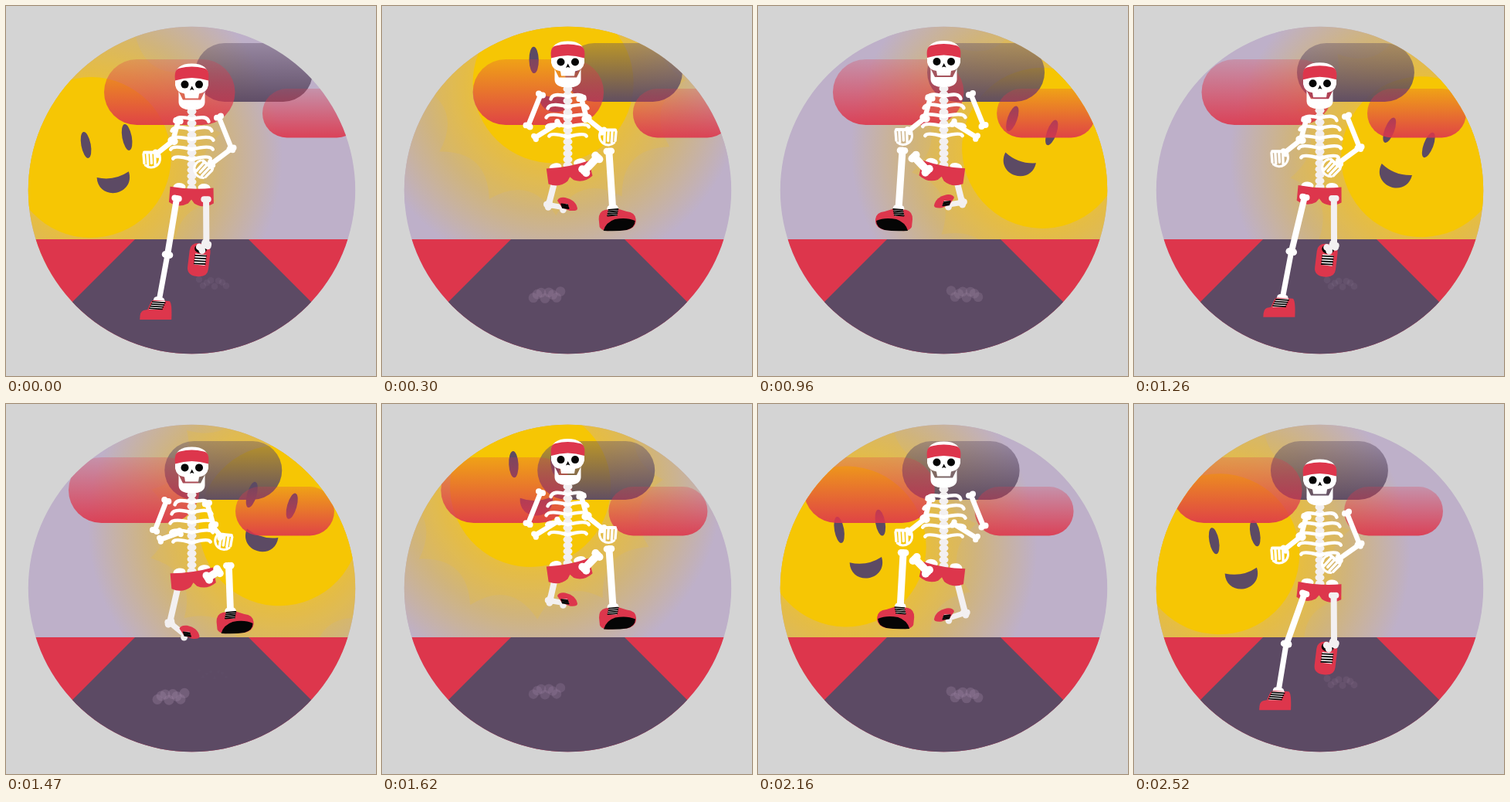
Animation of 479x479 px, one loop 2.55 s. Source, as an HTML page with a canvas:

```html
<!DOCTYPE html>
<html lang="en">
<head>
<meta charset="utf-8">
<title>Running skeleton</title>
<style>
html, body { margin: 0; width: 100%; height: 100%; overflow: hidden; background: #d4d4d4; }
canvas { display: block; }
</style>
</head>
<body>
<canvas id="stage" width="479" height="479"></canvas>
<script>
const c = document.getElementById('stage').getContext('2d');
const LOOP = 2550, CYCLE = LOOP / 2, STEP = CYCLE / 2, MID = 240.5;
const RED = '#dd364c', PLUM = '#5c4a64', SKY = '#beb0c9', GOLD = '#f6c604';
const BONE = '#fff', BONE_BACK = '#f3f0f1', BLACK = '#050505';

const mod = (a, n) => ((a % n) + n) % n;
const rad = d => d * Math.PI / 180;
const mix = (a, b, u) => a.map((v, i) => v + (b[i] - v) * u);
// Smooth 0 to 1 between two times.
const ramp = (t, from, to) => {
  const u = Math.min(1, Math.max(0, (t - from) / (to - from)));
  return u * u * (3 - 2 * u);
};

// --- Motion ---

// Top of the head: a quick push up, then a slower fall.
function bodyTop(t) {
  const u = mod(t - 95, STEP) / STEP, rise = .37;
  const w = u < rise ? (u / rise) ** .55 : 1 + (u - rise) / (1 - rise);
  return 62 + 17 * Math.cos(Math.PI * w);
}
const hipTilt = p => -11 * Math.sin(2 * Math.PI * (p - 35) / CYCLE);

// 1 while the runner is in the air.
function airborne(p) {
  const s = mod(p, STEP);
  return ramp(s, 0, 247) - ramp(s, 345, STEP);
}

// Key poses of a leg: time, knee, ankle.
const STRIDE = [
  [0, 209, 322, 198, 381],
  [250, 213, 270, 235, 277],
  [330, 217, 254, 235, 257],
  [620, 222, 310, 230, 315],
  [890, 188, 192, 184, 262],
  [970, 187, 187, 182, 262],
  [1245, 197, 310, 187, 371]];

// Periodic cubic through the key poses, without overshoot.
function legPose(p) {
  const n = STRIDE.length;
  const key = i => STRIDE[mod(i, n)];
  const time = i => key(i)[0] + Math.floor(i / n) * CYCLE;
  const rate = (i, k) => (key(i + 1)[k] - key(i)[k]) / (time(i + 1) - time(i));
  const slope = (i, k) => {
    const a = rate(i - 1, k), b = rate(i, k);
    return a * b <= 0 ? 0 : 2 * a * b / (a + b);
  };
  let i = n - 1;
  while (time(i) > p) i--;
  const h = time(i + 1) - time(i), u = (p - time(i)) / h, v = 1 - u;
  return [1, 2, 3, 4].map(k =>
    key(i)[k] * v * v * (1 + 2 * u) + key(i + 1)[k] * u * u * (3 - 2 * u)
    + h * u * v * (v * slope(i, k) - u * slope(i + 1, k)));
}

// Shoulder, elbow and hand, measured from the top of the head.
const ARM_FRONT = [223, 74, 216, 100, 187, 123];
const ARM_BACK = [205.5, 69, 189, 110, 225, 137];
const HAND_TUCKED = [240, 99];

// Swing across on one step, then a little bob on the next.
function sunAngle(t) {
  const p = mod(t, CYCLE), way = t < CYCLE ? 1 : -1, u = p / 626;
  if (u >= 1) return way * (73.5 - 5.4 * Math.sin(Math.PI * (p - 626) / (CYCLE - 626)));
  const e = u < .5 ? 4 * u ** 3 : 1 - 4 * (1 - u) ** 3;
  return way * (147 * e - 73.5);
}

// --- Drawing helpers ---

function fill(color, d) {
  c.fillStyle = color;
  c.fill(new Path2D(d));
}
function oval(x, y, rx, ry = rx) {
  c.beginPath();
  c.ellipse(x, y, rx, ry, 0, 0, 7);
  c.fill();
}
function line(w, x1, y1, x2, y2) {
  c.lineWidth = w;
  c.beginPath();
  c.moveTo(x1, y1);
  c.lineTo(x2, y2);
  c.stroke();
}
function placed(x, y, turn, paint) {
  c.save();
  c.translate(x, y);
  c.rotate(turn);
  paint();
  c.restore();
}
function mirrored(side, paint) {
  c.save();
  if (side) { c.translate(2 * MID, 0); c.scale(-1, 1); }
  paint();
  c.restore();
}

// --- Skeleton ---

// A shaft with a pair of knobs at either end.
function bone(x1, y1, x2, y2, w, knob, color) {
  const a = Math.atan2(y2 - y1, x2 - x1);
  const dx = -Math.sin(a) * knob / 2, dy = Math.cos(a) * knob / 2;
  c.strokeStyle = c.fillStyle = color;
  line(w, x1, y1, x2, y2);
  for (const s of [-1, 1]) {
    oval(x1 + dx * s, y1 + dy * s, knob * .72);
    oval(x2 + dx * s, y2 + dy * s, knob * .72);
  }
}

function laces(x, y, w, h, skew) {
  fill(BONE, `M${x + skew} ${y}h${w}l${-skew} ${h}h${-w}z`);
  c.strokeStyle = BLACK;
  for (let k = .1; k < 1; k += .25) {
    const s = x + skew * (1 - k);
    line(1.8, s, y + h * k, s + w, y + h * k + 1);
  }
}

const shoes = {
  planted() {
    fill(RED, 'M-11 3Q-9-1-4 0L13 1Q17 2 16 25H-25Q-25 14-20 13L-15 12Z');
    laces(-13, 1, 16, 11, 5);
  },
  lifted() {
    fill(RED, 'M-8-9Q-6-14 2-13Q16-10 18 1Q18 5 8 4L-2 0Z');
    laces(-1, -5, 8, 6, -2);
  },
  hanging() {
    fill(RED, 'M-13 4Q-13-7 1-7Q14-7 14 4V25Q14 36 1 36Q-13 36-13 25Z');
    c.fillStyle = BLACK;
    oval(0, 0, 8, 6);
    laces(-8, 7, 14, 14, 0);
  },
  raised() {
    fill(RED, 'M-30 14Q-29 5-18 4L-5 0L10 2Q18 4 18 14L17 24Q14 30 4 29L-18 28Q-31 25-30 14Z');
    fill(BLACK, 'M-29 16Q-18 11-3 14Q9 18 12 29Q-6 30-18 28Q-29 25-29 16Z');
    laces(-5, 0, 12, 10, -2);
  }
};
const shoeAt = p =>
  p < 120 || p > 1190 ? 'planted' : p < 480 ? 'lifted' : p < 770 ? 'hanging' : 'raised';

function leg({ side, p }, top, tilt) {
  const [kx, ky, ax, ay] = legPose(p);
  const a = rad(side ? -tilt : tilt), gap = p > STEP ? airborne(p) : 0;
  const hx = MID - 19 * Math.cos(a) - 14 * Math.sin(a);
  const hy = top + 161 - 19 * Math.sin(a) + 14 * Math.cos(a) - 3 * gap;
  const kind = shoeAt(p), hanging = kind === 'hanging';
  const color = hanging || kind === 'lifted' ? BONE_BACK : BONE;
  const foot = () => placed(ax, ay, hanging ? rad(-7) : 0, shoes[kind]);
  mirrored(side, () => {
    if (hanging) foot();
    bone(hx, hy, kx + 15 * gap, ky + 8 * gap, 8 + 2 * gap, 5.5 + 1.5 * gap, color);
    bone(kx, ky, ax, ay, 7 + 2 * gap, 6, color);
    if (!hanging) foot();
  });
}

function fist() {
  c.strokeStyle = BONE;
  for (let i = 0; i < 4; i++) line(3.4, -9 + i * 4.9, -6, -8 + i * 4.7, 6 + i % 2 * 2);
  line(4, -8, -8, 8, -8);
  c.lineWidth = 3;
  c.beginPath();
  c.arc(1, 0, 11.5, -.6, 2.3);
  c.stroke();
}

function arm({ side, p }, top) {
  const swing = ramp(p, 22, 247) - ramp(p, 660, 885), tuck = swing * airborne(p);
  const [sx, sy, ex, ey, ...reach] = mix(ARM_FRONT, ARM_BACK, swing);
  const [hx, hy] = mix(reach, HAND_TUCKED, tuck);
  const fx = ex + 9 * tuck, fy = ey + 15 * tuck;
  mirrored(side, () => placed(0, top, 0, () => {
    bone(sx, sy, ex, ey, 6.5, 5.5, BONE);
    bone(fx, fy, ...mix([hx, hy], [fx, fy], .28), 6.5, 5, BONE);
    if (tuck < .7) placed(hx, hy, -.7 * swing, fist);
  }));
}

function torso() {
  c.fillStyle = BONE_BACK;
  for (let y = 62; y < 164; y += 7.6) oval(MID, y, 6, 4.6);
  c.strokeStyle = BONE;
  c.lineWidth = 4.6;
  for (let i = 0; i < 5; i++) {
    const y = 69 + i * 13, w = 19 + 9 * Math.sin((i + .6) * .55);
    for (const s of [-w, w]) {
      c.beginPath();
      c.moveTo(MID, y + 3);
      c.quadraticCurveTo(MID + s * .9, y - 3, MID + s, y + 6 - i);
      c.stroke();
    }
  }
}

function pelvis() {
  c.fillStyle = BONE;
  oval(-16, -1, 8, 5);
  oval(16, -1, 8, 5);
  fill(RED, 'M-28-1Q0 3 28-1L29 19Q16 27 4 20L0 15L-4 20Q-16 27-29 19Z');
}

function head() {
  fill(BONE, 'M223.5 36V50Q224 60 240.5 60Q257 60 257.5 50V36L252 47H229Z');
  fill(BONE, 'M219 17Q219 0 240.5 0Q262 0 262 17V28Q260 38 250 39L249 45H232L231 39Q221 38 219 28Z');
  fill(RED, 'M219 22Q217 7 225 6Q240.5 2 256 6Q264 7 262 22Q240.5 15 219 22Z');
  c.fillStyle = BLACK;
  oval(231.5, 27, 5);
  oval(250, 27, 5);
  fill(BLACK, 'M240.7 29L243.5 34.5L240.7 33.5L238 34.5Z');
}

function runner(legs, top, tilt) {
  c.lineCap = c.lineJoin = 'round';
  const trailing = l => shoeAt(l.p) === 'lifted';
  const behind = l => trailing(l) || shoeAt(l.p) === 'hanging';
  const ordered = [...legs].sort((a, b) => behind(b) - behind(a));
  ordered.filter(trailing).forEach(l => leg(l, top, tilt));
  placed(0, top, 0, torso);
  placed(MID, top + 161, rad(tilt), pelvis);
  ordered.filter(l => !trailing(l)).forEach(l => leg(l, top, tilt));
  legs.forEach(l => arm(l, top));
  placed(0, top, 0, head);
}

// --- Scenery ---

function dust({ side, p }) {
  const u = mod(p - 190, CYCLE) / 700;
  if (u > 1) return;
  mirrored(side, () => {
    c.fillStyle = `rgba(155,130,160,${.36 * (1 - u)})`;
    for (let i = 0; i < 8; i++)
      oval(196 + i * 5, 379 - 32 * u + 4.5 * Math.sin(i * 2.3 + 1), 1 + 5.5 * (1 - u * u));
  });
}

function sun(t) {
  const a = sunAngle(t), k = a / 73.5;
  placed(241 + 137 * Math.sin(rad(a)), 235 - 137 * Math.cos(rad(a)), 0, () => {
    const g = c.createRadialGradient(0, 0, 100, 0, 0, 248);
    g.addColorStop(0, '#e6be42');
    g.addColorStop(.45, '#d0b47c');
    g.addColorStop(1, SKY);
    c.fillStyle = g;
    oval(0, 0, 248);
    c.rotate(rad(a * (a > 0 ? .285 : .145)));

    c.fillStyle = 'rgba(232,188,50,.24)';
    c.beginPath();
    for (let i = 0; i <= 12; i++) {
      const q = i * Math.PI / 6, m = q - Math.PI / 12;
      c.quadraticCurveTo(122 * Math.cos(m), 122 * Math.sin(m), 172 * Math.cos(q), 172 * Math.sin(q));
    }
    c.fill();

    c.fillStyle = GOLD;
    oval(0, 0, 104);
    c.translate(-24 * k, -30 + 13 * k ** 8);
    c.fillStyle = PLUM;
    oval(-27, 0, 6.2, 17.2);
    oval(27, 0, 6.2, 17.2);
    fill(PLUM, 'M-21 44Q0 53 21 44C23 59 12 68 0 68C-12 68-23 59-21 44Z');
  });
}

function cloud(x, y, w, h, rgb, from, to) {
  const g = c.createLinearGradient(0, y, 0, y + h);
  g.addColorStop(0, `rgba(${rgb},${from})`);
  g.addColorStop(1, `rgba(${rgb},${to})`);
  c.fillStyle = g;
  c.beginPath();
  c.roundRect(x, y, w, h, h / 2);
  c.fill();
}

function draw(t) {
  const legs = [0, 1].map(side => ({ side, p: mod(t + side * STEP, CYCLE) }));
  c.fillStyle = '#d4d4d4';
  c.fillRect(0, 0, 479, 479);
  c.save();
  c.beginPath();
  c.arc(MID, 238.5, 211.7, 0, 7);
  c.clip();
  c.fillStyle = SKY;
  c.fillRect(0, 0, 479, 479);
  sun(t);
  cloud(245 - t * .027, 48, 152, 76, '92,74,100', .4, .96);
  cloud(127 - t * .0313, 69, 169.5, 85, '221,54,76', .25, .9);
  cloud(332 - t * .0238, 107, 128, 63.5, '221,54,76', .25, .9);
  c.fillStyle = RED;
  c.fillRect(0, 302, 479, 177);
  fill(PLUM, 'M167 302H314L491 479H-10Z');
  legs.forEach(dust);
  runner(legs, bodyTop(t), hipTilt(legs[0].p));
  c.restore();
}

const start = performance.now();
function tick() {
  draw(mod(performance.now() - start, LOOP));
  requestAnimationFrame(tick);
}
tick();
</script>
</body>
</html>
```
